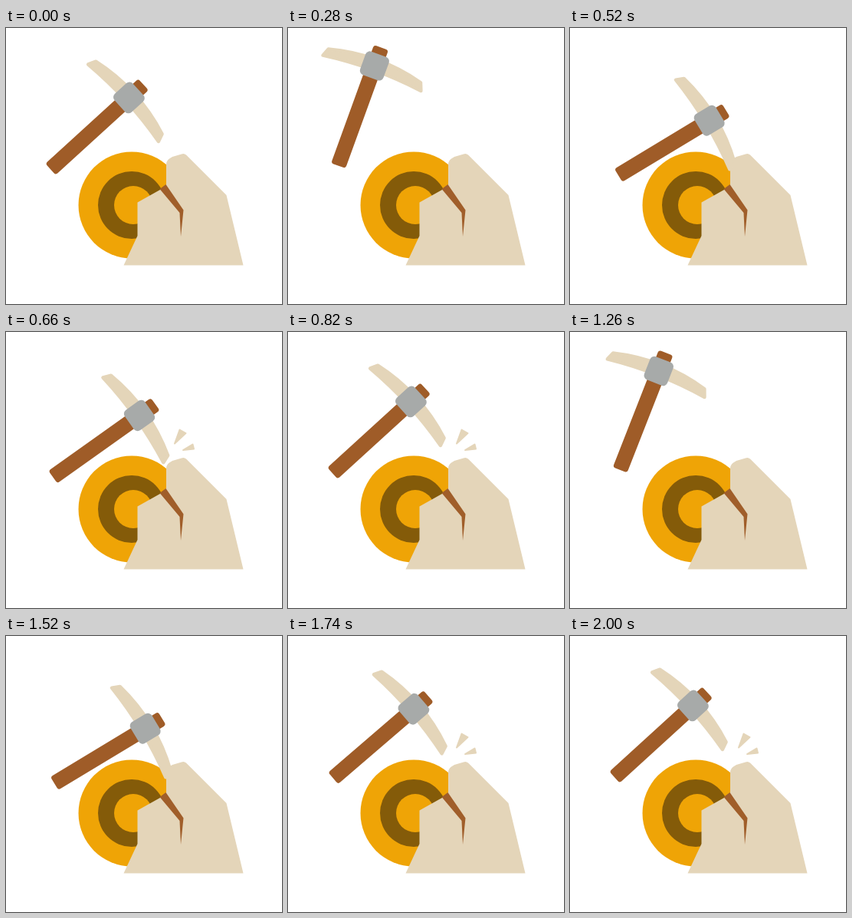
An HTML page that plays this animation: 360 by 360 pixels, repeating every 2.02 s.

```html
<!DOCTYPE html>
<html lang="en">
<head>
<meta charset="utf-8">
<title>Mining</title>
<style>
  html, body { margin: 0; width: 100%; height: 100%; overflow: hidden; background: #fff; }
  svg { display: block; width: 100vw; height: 100vh; }
</style>
</head>
<body>
<svg viewBox="0 0 360 360">
  <circle cx="164" cy="231" r="69.500" fill="#efa406"/>
  <circle cx="164" cy="231" r="44" fill="#845b09"/>
  <circle cx="166" cy="231" r="25" fill="#efa406"/>
  <g id="rock">
    <path fill="#e4d5b9" d="M153.500 309.500L171.500 271V227.500L201 211L209 204V178Q209 173.500 213 170.500L217 168L229 164.500Q232 163 235 165.500L287.500 218L309.500 309.500Z"/>
    <path fill="#a05e2a" d="M200.500 210L208.500 204L231.500 237.500L228 272L226.500 241Z"/>
  </g>
  <g id="chips" fill="#e4d5b9" stroke="#e4d5b9" stroke-width="2" stroke-linejoin="round">
    <path d="M220 145.500L226.500 127.500L234.500 132Z"/>
    <path d="M231 154L243.500 146.500L245 152.500Z"/>
  </g>
  <!-- Pickaxe lies along x, with the butt of its handle at the origin -->
  <g id="pick">
    <rect x="-0.500" y="-10" width="164" height="20" rx="3.500" fill="#9f5c28"/>
    <path fill="#e4d5b9" stroke="#e4d5b9" stroke-width="4.500" stroke-linejoin="round" d="M138 -64Q155 0 138 64L128 68Q137 0 128 -68Z"/>
    <rect x="121.800" y="-16.200" width="32.400" height="32.400" rx="6" fill="#a7aaa9"/>
  </g>
</svg>
<script>
  const LOOP = 2020, SWING = 1000;
  const [rock, chips, pick] = ["rock", "chips", "pick"].map(id => document.getElementById(id));

  // Poses: x, y of the handle butt and its angle
  const REST = [58.5, 184, -42.4], RAISED = [66, 179, -70.9], HIT = [63.5, 192, -31.1];
  const KEYS = [[30, REST], [310, RAISED], [520, HIT], [560, HIT], [800, REST]];

  const progress = (t, a, b) => Math.min(1, Math.max(0, (t - a) / (b - a)));
  const ease = p => p * p * (3 - 2 * p);

  function poseAt(t) {
    let pose = REST;
    for (let i = 1; i < KEYS.length; i++) {
      const [from, a] = KEYS[i - 1], [to, b] = KEYS[i];
      if (t >= from) {
        const p = ease(progress(t, from, to));
        pose = a.map((v, j) => v + (b[j] - v) * p);
      }
    }
    return pose;
  }

  function draw(now) {
    const time = now % LOOP;
    const t = time < SWING + 10 ? time : time - SWING;
    const [x, y, angle] = poseAt(t);
    pick.setAttribute("transform", `translate(${x} ${y}) rotate(${angle})`);

    const jolt = 3 * Math.sin(Math.PI * progress(t, 545, 635));
    rock.setAttribute("transform", `translate(0 ${jolt})`);

    const size = ease(progress(t, 530, 640));
    chips.setAttribute("transform", `translate(212 162) scale(${size}) translate(-212 -162)`);
    chips.setAttribute("visibility", size > 0 ? "visible" : "hidden");
  }

  const start = performance.now();
  function tick() {
    draw(performance.now() - start);
    requestAnimationFrame(tick);
  }
  tick();
</script>
</body>
</html>
```
